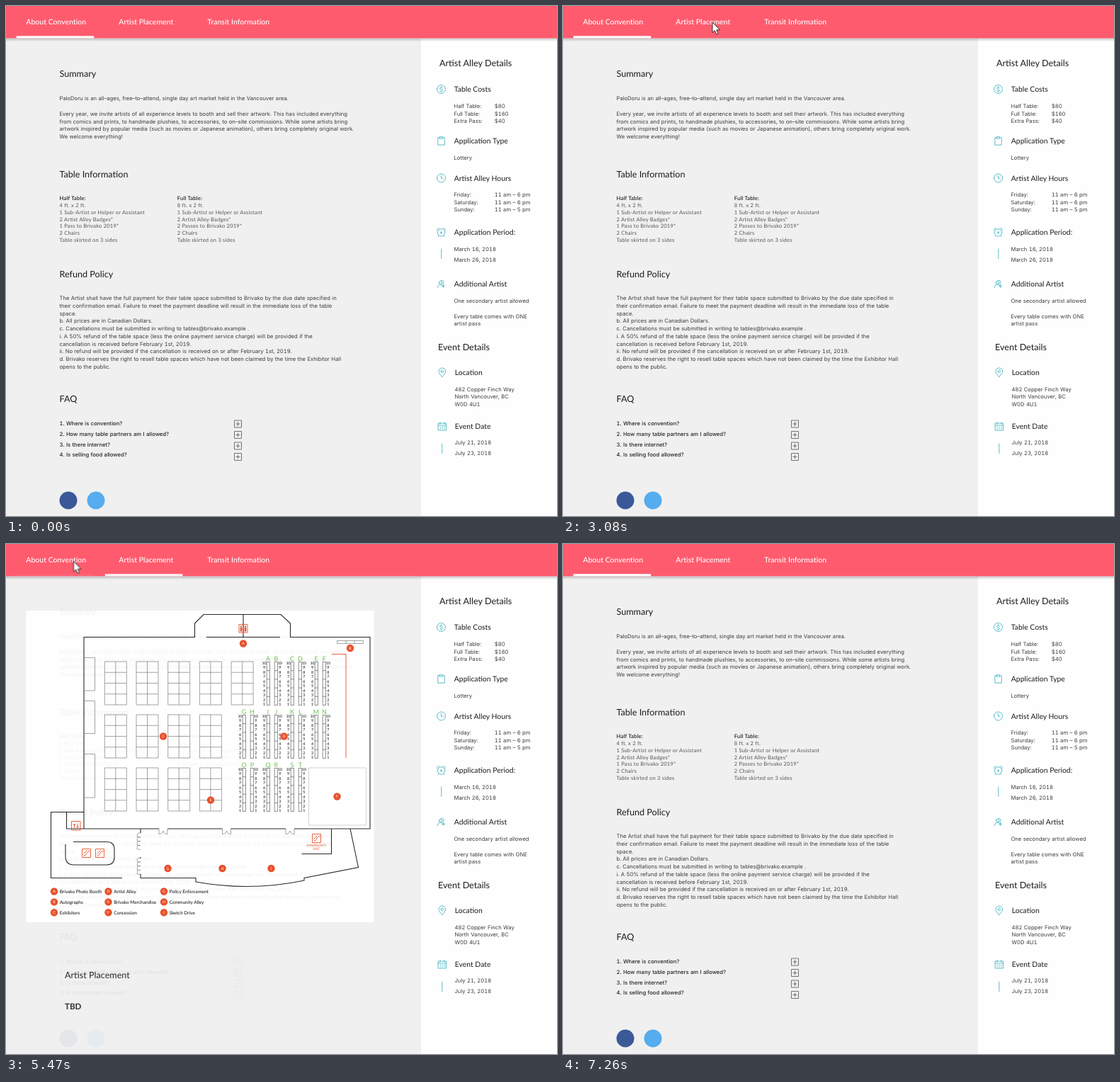
Animation, 778 px wide and 720 px high, one loop 7.42 s. Source, as an HTML page:

```html
<!DOCTYPE html>
<html lang="en">
<head>
<meta charset="utf-8">
<title>Artist Alley</title>
<style>
html, body { margin: 0; width: 100%; height: 100%; overflow: hidden; background: #f0f0f0; }
svg { display: block; }
text { text-rendering: geometricPrecision; white-space: pre; }
.nav, .h1, .h2, .thin, .mid, .key, .tbd, .num, .row, .dot, .exit { font-family: Lato, "Open Sans", sans-serif; }
.nav { font-size: 10.4px; letter-spacing: .06px; font-weight: 500; fill: #fff; }
.h1 { font-size: 12.6px; font-weight: 400; fill: #1c1c1c; }
.h2 { font-size: 10.4px; font-weight: 400; fill: #1c1c1c; }
.thin { font-size: 7.5px; letter-spacing: .22px; font-weight: 400; fill: #555; }
.mid { font-size: 7.6px; letter-spacing: .22px; font-weight: 500; fill: #111; }
.body, .faq { font-family: Inter, "Noto Sans", sans-serif; font-size: 7.65px; word-spacing: .33px;
  font-feature-settings: "tnum"; fill: #3c3c3c; }
.faq { font-weight: 500; fill: #222; }
.tbd { font-size: 11.6px; font-weight: 700; fill: #222; }
.key { font-size: 6.5px; font-weight: 500; fill: #111; }
.num { font-size: 5.4px; font-weight: 500; fill: #111; text-anchor: middle; }
.row { font-size: 9px; fill: #62bb46; text-anchor: middle; }
.dot { font-size: 5.2px; fill: #fff; text-anchor: middle; }
.exit { font-size: 4.6px; fill: #e8481f; text-anchor: middle; }
.icon { fill: none; stroke: #35adbb; stroke-width: .8; stroke-linecap: round; stroke-linejoin: round; }
.wall { fill: none; stroke: #1c1c1c; stroke-width: 1.1; }
.fine { fill: none; stroke: #777; stroke-width: .7; }
.plus { fill: none; stroke: #555; stroke-width: .8; }
.red { fill: none; stroke: #e8481f; stroke-width: .9; }
</style>
</head>
<body>
<svg id="stage" width="778" height="720" viewBox="0 0 778 720"></svg>
<script>
const LOOP = 7420;

const text = (cls, x, y, s) => `<text class="${cls}" x="${x}" y="${y}">${s}</text>`;
const lines = (cls, x, y, step, list) =>
  list.map((s, i) => text(cls, x, +(y + i * step).toFixed(2), s)).join('');
const path = (cls, d) => `<path class="${cls}" d="${d}"/>`;
const rect = (x, y, w, h, fill, extra = '') =>
  `<rect x="${x}" y="${y}" width="${w}" height="${h}" fill="${fill}" ${extra}/>`;
const circle = (x, y, r, fill) => `<circle cx="${x}" cy="${y}" r="${r}" fill="${fill}"/>`;
const ring = (x, y, r) => `M${x - r} ${y}a${r} ${r} 0 1 0 ${2 * r} 0a${r} ${r} 0 1 0 ${-2 * r} 0`;

function home() {
  const plus = [590, 605.5, 621, 636.5]
    .map(y => `M322.5 ${y - 5}h10v10h-10zM324.5 ${y}h6M327.5 ${y - 3}v6`).join('');
  const table = (x, name, feet, passes) =>
    text('mid', x, 274.2, name) +
    lines('thin', x, 284, 9.75, [feet, '1 Sub-Artist or Helper or Assistant',
      '2 Artist Alley Badges*', passes + ' to Brivako 2019*', '2 Chairs', 'Table skirted on 3 sides']);
  return text('h1', 75.5, 100.3, 'Summary') +
    text('body', 75.5, 133.2, 'PaloDoru is an all–ages, free–to–attend, single day art market held in the Vancouver area.') +
    lines('body', 75.5, 154.9, 10.7, [
      'Every year, we invite artists of all experience levels to booth and sell their artwork. This has included everything',
      'from comics and prints, to handmade plushies, to accessories, to on–site commissions. While some artists bring',
      'artwork inspired by popular media (such as movies or Japanese animation), others bring completely original work.',
      'We welcome everything!']) +
    text('h1', 75.5, 242, 'Table Information') +
    table(75.5, 'Half Table:', '4 ft. x 2 ft.', '1 Pass') +
    table(241.8, 'Full Table:', '8 ft. x 2 ft.', '2 Passes') +
    text('h1', 75.5, 382.6, 'Refund Policy') +
    lines('body', 75.5, 415.2, 10.72, [
      'The Artist shall have the full payment for their table space submitted to Brivako by the due date specified in',
      'their confirmation email. Failure to meet the payment deadline will result in the immediate loss of the table',
      'space.',
      'b. All prices are in Canadian Dollars.',
      'c. Cancellations must be submitted in writing to tables@brivako.example .',
      'i. A 50% refund of the table space (less the online payment service charge) will be provided if the',
      'cancellation is received before February 1st, 2019.',
      'ii. No refund will be provided if the cancellation is received on or after February 1st, 2019.',
      'd. Brivako reserves the right to resell table spaces which have not been claimed by the time the Exhibitor Hall',
      'opens to the public.']) +
    text('h1', 75.5, 559.4, 'FAQ') +
    lines('faq', 75.5, 592.3, 14.72, ['1. Where is convention?',
      '2. How many table partners am I allowed?', '3. Is there internet?', '4. Is selling food allowed?']) +
    path('plus', plus) + circle(88, 698, 12.5, '#3b5998') + circle(127, 698, 12.5, '#55acee');
}

// Two-by-four block of booths
function block(x, y) {
  let d = `M${x} ${y}h31v61h-31zM${x + 15.5} ${y}v61`;
  for (let i = 1; i < 4; i++) d += `M${x} ${y + i * 15.25}h31`;
  return path('fine', d);
}

// Two facing rows of ten numbered tables
function pair(x, y, a, b) {
  let d = '', out = text('row', x, y - .6, a) + text('row', x + 11.4, y - .6, b);
  for (const sx of [x - 1.8, x + 9.2]) {
    d += `M${sx} ${y + .5}h4.2v61h-4.2z`;
    for (let i = 1; i < 5; i++) d += `M${sx} ${y + .5 + i * 12.2}h4.2`;
  }
  for (let i = 0; i < 10; i++) {
    const ny = +(y + 4 + i * 6.45).toFixed(2);
    out += text('num', x - 5.4, ny, 10 - i) + text('num', x + 16.8, ny, 10 - i);
  }
  return out + `<path d="${d}" fill="none" stroke="#333" stroke-width=".6"/>`;
}

const marker = (x, y, s) => circle(x, y, 5.2, '#e8481f') + text('dot', x, y + 1.9, s);

function floorPlan() {
  const tops = [166, 241, 316];
  let s = rect(0, 46, 586, 674, '#f0f0f0') + rect(28.5, 94, 491, 440, '#fff');
  s += path('wall', 'M110 131.5H266.5V112L279 99.5H388L401.5 112V131.5H514V402H110ZM283 131.5H387M335 99.5V131.5' +
    'M110 378.5H63.5V471.5H164M85.5 378.5V402H110M84 424V441Q84 453 96 453H142Q153 453 153 442V431Q153 420.5 142 420.5H95' +
    'M190 402V408M190 442V444M190 466V471.5H268V477Q345 491 421 475V471.5L497.5 456.5L486 402M459.5 402V437.5H417.5');
  s += path('fine', 'M110 160.5H125.5V207H110M110 221.5H125.5V267.5H110M110 296.5H125.5V358H110' +
    'M467.5 136.5H504.5V140.5H467.5ZM480 136.5V140.5M492 136.5V140.5');
  let curtain = '';
  for (const y of [408, 443]) {
    curtain += `M190 ${y}`;
    for (let i = 0; i < 4; i++) curtain += 'q-6 0 -4.5 3q-1.5 3 1 2.8q2 0 3.5 0';
  }
  s += path('fine', curtain);
  for (const x of [216, 305.5, 395]) {
    s += rect(x, 401, 12, 2, '#fff') + path('fine', `M${x} 402v7.5q5 0 6 -4.5q1 4.5 6 4.5v-7.5`);
  }
  s += `<rect x="427.5" y="316" width="81" height="81" fill="none" stroke="#bbb" stroke-width=".7"/>`;
  s += path('red', 'M460 155.5H480V302');
  tops.forEach((y, r) => {
    for (let i = 0; i < (r ? 4 : 5); i++) s += block(139.3 + i * 44.7, y);
  });
  ['  ABCDEF', 'GHIJKLMN', 'OPQRST'].forEach((names, r) => {
    for (let i = 0; i < names.length; i += 2)
      if (names[i] !== ' ') s += pair(336 + i * 17, tops[r], names[i], names[i + 1]);
  });
  // Lift, stairs and exit signs
  s += path('red', 'M329 113.5h12v11.5h-12zM335 113.5v11.5' +
    'M92.5 391.5h12.5v12.5h-12.5zM96.5 401v-6l-1.5 2m1.5 -2l1.5 2M101 394.5v6l-1.5 -2m1.5 2l1.5 -2');
  for (const x of [332, 338]) s += circle(x, 116.5, 1.2, '#e8481f') + rect(x - 1.3, 118, 2.6, 5.5, '#e8481f');
  for (const [x, y] of [[107.5, 430.5], [126.5, 430.5], [432.5, 409.5]])
    s += path('red', `M${x} ${y}h12v12h-12zM${x + 2} ${y + 9.5}h2l5 -6.5h2M${x + 2} ${y + 7}l5 -5`);
  s += text('exit', 438.5, 427, 'EMERGENCY') + text('exit', 438.5, 431.6, 'EXIT');

  [[335, 140.5], [486, 147], [222, 271.5], [392.5, 271.5], [289, 361.5], [467.5, 356.5],
   [228.5, 458], [305.5, 458], [374.5, 458]].forEach(([x, y], i) => s += marker(x, y, 'ABCDEFGHI'[i]));
  ['Brivako Photo Booth', 'Autographs', 'Exhibitors', 'Artist Alley', 'Brivako Merchandise',
   'Concession', 'Policy Enforcement', 'Community Alley', 'Sketch Drive'].forEach((name, i) => {
    const x = [68, 144.5, 223][Math.floor(i / 3)], y = 490.5 + i % 3 * 14.9;
    s += marker(x, y, 'ABCDEFGHI'[i]) + text('key', x + 7.7, y + 2.3, name);
  });
  return s + text('h1', 83, 613.3, 'Artist Placement') + text('tbd', 83, 657.2, 'TBD');
}

function side() {
  const icons = [
    // coin
    ring(614.5, 117.5, 6), 'M616.3 115.8q-.4 -1 -1.8 -1q-1.8 0 -1.8 1.3t1.8 1.4t1.8 1.5t-1.8 1.4q-1.4 0 -1.8 -1M614.5 113.8v1M614.5 120.4v1',
    // clipboard
    'M612.5 185.8h-2.7v10.4h9.4v-10.4h-2.7M612.5 184.7h4v2.4h-4z',
    // clock
    ring(614.5, 243, 6), 'M614.5 239.5v3.8h2.8',
    // alarm clock
    ring(614.5, 320, 5.2), 'M613 320h3M614.5 318.5v3M608.8 317a2.3 2.3 0 0 1 3 -3M620.2 317a2.3 2.3 0 0 0 -3 -3M611 324.2l-1 1.2M618 324.2l1 1.2',
    // person with plus
    ring(613.5, 390.5, 2.2), 'M609.5 397.5q.3 -4.5 4 -4.5q1.5 0 2.5 1M614.5 387.5q3.500 -.8 3.500 2.500q0 1.500 -1.500 2.200M617.500 393v4.500M615.300 395.300h4.500',
    // pin
    'M615.8 523.500q-4.800 -5 -4.800 -7.700a4.800 4.800 0 0 1 9.600 0q0 2.700 -4.800 7.700z', ring(615.8, 515.8, 1.7),
    // calendar
    'M610.500 589h11v10h-11zM610.500 592h11M613 587.700v2.300M619 587.700v2.300',
    'M613 594.500h.8M615.700 594.500h.8M618.400 594.500h.8M613 596.800h.8M615.700 596.800h.8M618.400 596.800h.8',
    // date ranges
    'M614.800 343v13.500M615.800 618v13.500'
  ].join('');
  return rect(586, 46, 192, 674, '#fefefe') +
    text('h1', 612, 85, 'Artist Alley Details') + text('h1', 610, 486.2, 'Event Details') +
    [[121.4, 'Table Costs'], [194.2, 'Application Type'], [246.6, 'Artist Alley Hours'],
     [323.4, 'Application Period:'], [396, 'Additional Artist']].map(([y, s]) => text('h2', 632.8, y, s)).join('') +
    text('h2', 633.8, 521.2, 'Location') + text('h2', 633.8, 596.8, 'Event Date') +
    lines('body', 632.5, 144.2, 10.6, ['Half Table:', 'Full Table:', 'Extra Pass:']) +
    lines('body', 689.8, 144.2, 10.6, ['$80', '$160', '$40']) +
    text('body', 632.5, 217, 'Lottery') +
    lines('body', 632.5, 269.2, 10.6, ['Friday:', 'Saturday:', 'Sunday:']) +
    lines('body', 689.8, 269.2, 10.6, ['11 am – 6 pm', '11 am – 6 pm', '11 am – 5 pm']) +
    lines('body', 632.5, 345.8, 14.8, ['March 16, 2018', 'March 26, 2018']) +
    lines('body', 632.5, 419.2, 10.7, ['One secondary artist allowed', '', 'Every table comes with ONE', 'artist pass']) +
    lines('body', 633.5, 543.8, 10.6, ['482 Copper Finch Way', 'North Vancouver, BC', 'W0D 4U1']) +
    lines('body', 633.5, 619.3, 14.8, ['July 21, 2018', 'July 23, 2018']) +
    path('icon', icons);
}

const header = () =>
  rect(0, 45.5, 778, 5, 'url(#shade)') + rect(0, 0, 778, 45.5, '#ff5b6e') +
  text('nav', 28.3, 25.5, 'About Convention') + text('nav', 159.3, 25.5, 'Artist Placement') +
  text('nav', 284.3, 25.5, 'Transit Information') +
  rect(14.7, 42.3, 109.5, 3.2, '#fff', 'id="tabA"') + rect(139.8, 42.3, 109.5, 3.2, '#fff', 'id="tabB"');

document.getElementById('stage').innerHTML = `
  <defs><linearGradient id="shade" x2="0" y2="1">
    <stop stop-opacity=".2"/><stop offset="1" stop-opacity="0"/></linearGradient></defs>
  ${rect(0, 0, 778, 720, '#f0f0f0')}
  <g>${home()}</g>
  <g id="plan" opacity="0">${floorPlan()}</g>
  ${side()}${header()}
  <g id="pointer" fill="#fff" stroke="#222" stroke-width=".9" stroke-linejoin="round">
    <circle id="click" r="10.3" fill="none" stroke-width="1.2" opacity="0"/>
    <path id="arrow" opacity="0" d="M0 0V14.5L3.3 11.6L5.6 17L8.1 16L5.8 10.8H10.5Z"/>
    <path id="hand" opacity="0" d="M0 .3C-1 .3 -1.5 1 -1.5 1.8V8.8L-2.8 7.4C-4 6.2 -5.6 7.4 -4.7 8.8L-1.5 13V15.5H6V13
      C7.5 11 8 9.5 8 7.2C8 5.5 6 5.2 5.7 6.2C5.7 4.8 3.8 4.5 3.5 5.5C3.3 4.5 1.8 4.4 1.5 5.2V1.8C1.5 1 1 .3 0 .3Z"/>
  </g>`;

// Each row: [ms, value, easing towards the next row]
function play(id, prop, table, easing, show = v => v) {
  const rows = [...table, [LOOP, table[table.length - 1][1]]];
  document.getElementById(id).animate(
    rows.map(([ms, v, e]) => ({ offset: ms / LOOP, [prop]: show(v), easing: e || easing })),
    { duration: LOOP, iterations: Infinity });
}
const HOLD = 'steps(1, end)', FADE = 'ease-in-out';

play('pointer', 'transform', [
  [0, [376, -8]], [330, [376, -8]], [460, [352, 3]], [600, [316, 14]], [730, [278, 22]], [860, [250, 25.5]],
  [1050, [233, 25]], [1200, [231, 24]], [2020, [231, 24]], [2160, [222, 22]], [2410, [211, 23]], [4040, [211, 23]],
  [4140, [180, 28]], [4210, [138, 31]], [4280, [104, 28]], [4490, [98, 25]], [4660, [98, 25]],
  [4790, [95.5, 24.5]]
], 'linear', ([x, y]) => `translate(${x}px, ${y}px)`);

play('arrow', 'opacity', [[0, 0], [340, 1], [1100, 0], [3080, 1], [4490, 0], [5350, 1], [7190, 0]], HOLD);
play('hand', 'opacity', [[0, 0], [1100, 1], [3080, 0], [4490, 1], [5350, 0], [7190, 1], [7260, 0]], HOLD);
play('click', 'opacity', [[0, 0], [2710, .8], [2920, 0], [5150, .8], [5350, 0]], HOLD);

const swap = (a, b) => [[0, a], [3160, a, FADE], [3420, b], [5415, b, FADE], [5750, a]];
play('plan', 'opacity', swap(0, 1), 'linear');
play('tabB', 'opacity', swap(0, 1), 'linear');
play('tabA', 'opacity', swap(1, 0), 'linear');
</script>
</body>
</html>
```
